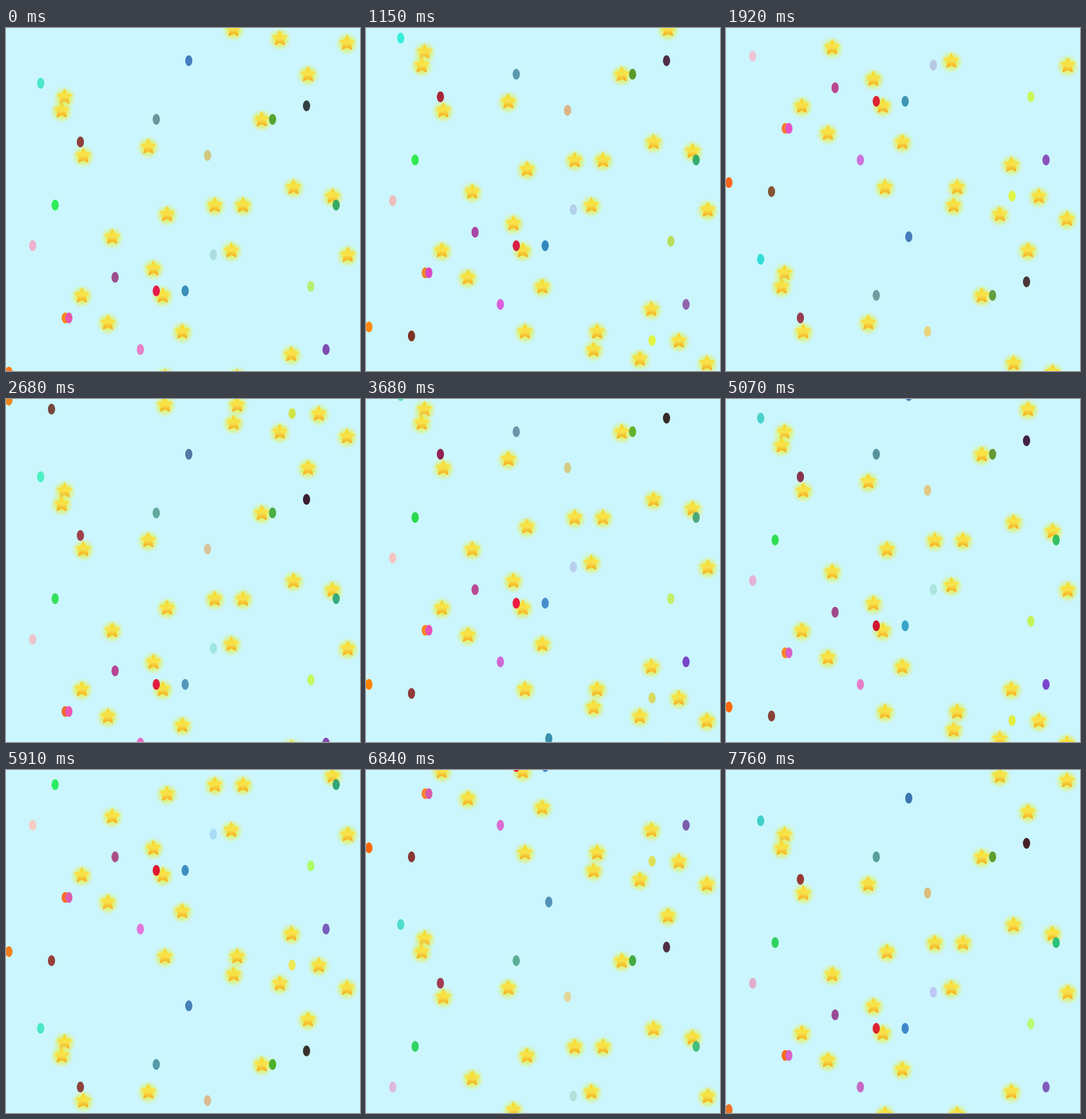
These frames come from a looping animation (490x475 px, 7840 ms). An HTML page with a canvas:

```html
<!DOCTYPE html>
<html lang="en">
<head>
<meta charset="utf-8">
<title>Falling stars</title>
<style>
  html, body { margin: 0; width: 100%; height: 100%; overflow: hidden; background: #cbf6fe; }
  canvas { display: block; }
</style>
</head>
<body>
<canvas id="stage" width="490" height="475"></canvas>
<script>
const ctx = document.getElementById('stage').getContext('2d');
const LOOP = 7840, ROWS = 81, ROW_HEIGHT = 6.25, TOP = 1.5;

// Key points: x and starting row; everything falls together and wraps
const stars = [
  [315, 0], [379, 2], [472, 3], [418, 10], [81, 15], [77, 18], [354, 20],
  [197, 26], [107, 28], [398, 35], [452, 37], [289, 39], [328, 39], [223, 41],
  [147, 46], [312, 49], [473, 50], [204, 53], [105, 59], [217, 59], [141, 65],
  [244, 67], [395, 72], [220, 77], [320, 77], [433, 79]
];
const dots = [
  [253, 7, 'steelblue'], [48, 12, 'turquoise'], [416, 17, '#402c38'],
  [208, 20, 'cadetblue'], [369, 20, '#5a3'], [103, 25, '#934'],
  [279, 28, '#d8c48c'], [457, 39, 'mediumseagreen'], [68, 39, '#3d5'],
  [37, 48, '#e8bbcc'], [287, 50, 'lightblue'], [151, 55, '#a49'],
  [422, 57, '#be6'], [208, 58, 'crimson'], [248, 58, '#49b'],
  [82, 64, '#f72'], [87, 64, '#d5b'], [186, 71, 'orchid'],
  [443, 71, '#85b'], [4, 76, '#f71'], [63, 78, '#843'], [396, 79, '#e2e450']
];

function random(seed) {
  const s = Math.sin(seed * 12.9898 + 4.1) * 43758.5453;
  return s - Math.floor(s);
}

function shade(gradient, ...colours) {
  colours.forEach((c, i) => gradient.addColorStop(i / (colours.length - 1), c));
  return gradient;
}

const glow = shade(ctx.createRadialGradient(0, 1, 4, 0, 1, 17),
  'rgba(238,236,70,.9)', 'rgba(230,240,90,.8)', 'rgba(222,242,120,.4)', 'rgba(215,245,170,0)');
const gold = shade(ctx.createLinearGradient(0, -11, 0, 11),
  '#f7cf2a', '#f7e03c', '#f8e24c', '#f6bd2a', '#f3a020');

const starPath = new Path2D();
for (let i = 0; i < 10; i++) {
  const r = i % 2 ? 5.6 : 11, a = i * Math.PI / 5;
  starPath.lineTo(r * Math.sin(a), -r * Math.cos(a));
}
starPath.closePath();

function drawStar(x, y) {
  ctx.save();
  ctx.translate(x, y + .5);
  ctx.fillStyle = glow;
  ctx.fillRect(-17, -16, 34, 34);
  ctx.fillStyle = ctx.strokeStyle = gold;
  ctx.lineJoin = 'round';
  ctx.fill(starPath);
  ctx.stroke(starPath);
  ctx.restore();
}

// Each channel flickers around the dot's own colour
function flicker(colour, seed) {
  ctx.fillStyle = colour;
  const rgb = ctx.fillStyle.match(/\w\w/g).map((h, c) =>
    Math.round(parseInt(h, 16) + 36 * (random(seed + c) - .5)));
  return `rgb(${rgb})`;
}

function drawDot(x, y, colour) {
  ctx.fillStyle = colour;
  ctx.beginPath();
  ctx.ellipse(x, y, 5, 7.5, 0, 0, 2 * Math.PI);
  ctx.fill();
}

function draw(t) {
  // 13 pictures a second on a 10 ms clock; one row of fall every 16 ms
  const clock = 10 * Math.floor(t / 10);
  const frame = Math.min(101, Math.floor((clock + 12.49) / 76.9));
  const start = Math.max(0, 10 * Math.floor((76.9 * frame - 2.5) / 10));
  const ticks = Math.floor(start / 16);
  const fall = row => TOP + ROW_HEIGHT * ((row + ticks) % ROWS);

  ctx.fillStyle = '#cbf6fe';
  ctx.fillRect(0, 0, 490, 475);
  stars.forEach(([x, row]) => drawStar(x, fall(row)));
  dots.forEach(([x, row, colour], i) =>
    drawDot(x, fall(row + 1) - ROW_HEIGHT, flicker(colour, frame * 71 + i * 3)));
}

const begin = performance.now();
function tick() {
  draw((performance.now() - begin) % LOOP);
  requestAnimationFrame(tick);
}
tick();
</script>
</body>
</html>
```
